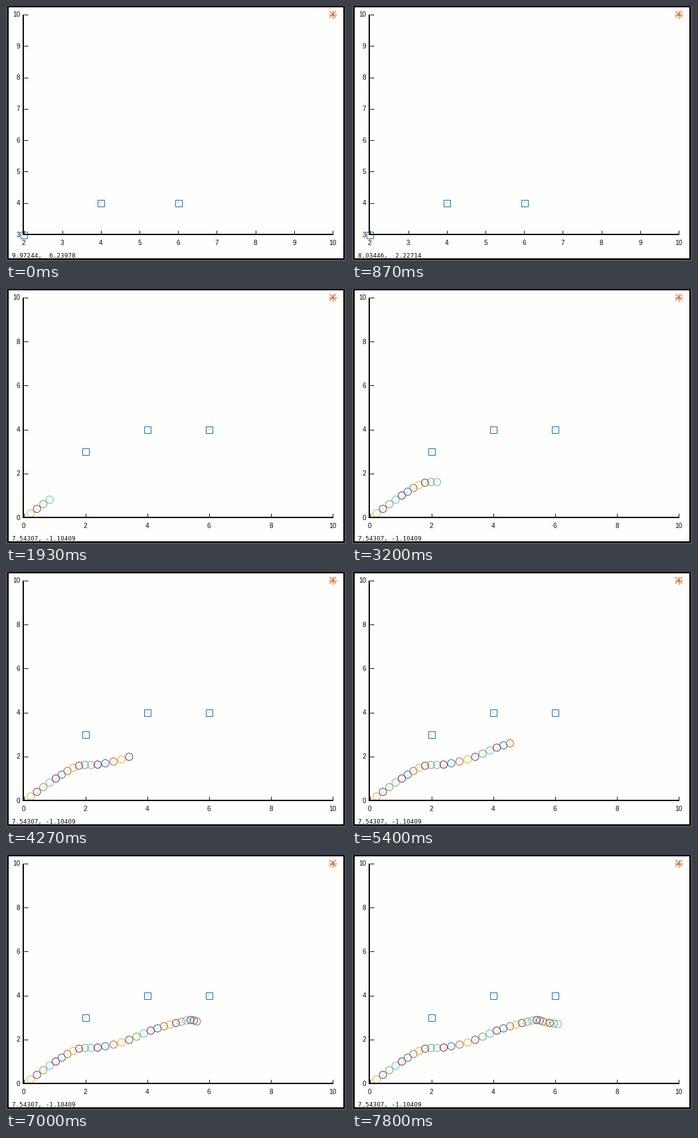
Write a matplotlib script that moves like this. It is 512 px wide and 384 px high and loops after 8000 ms.

```python
import numpy as np
import matplotlib.pyplot as plt
from matplotlib.animation import FuncAnimation
from matplotlib.patches import Circle, Rectangle

W, H, DPI = 512, 384, 64
LOOP, STEP = 8000, 40
PT = 72 / DPI                      # points per pixel
LEFT, RIGHT, TOP, BOTTOM = 26.5, 492, 13, 344
PAPER, EDGE, INK = "#fefefd", "#50524c", "#0c0c08"
YELLOW, PURPLE, GREEN, CYAN = "#e4b02c", "#74387c", "#78a636", "#56bcdc"
RED, BLUE, ORANGE = "#9c1c34", "#1472b4", "#cc5a20"
CYCLE = [YELLOW, PURPLE, GREEN, CYAN, RED, BLUE, ORANGE]

RESCALE = 1470                     # when the axes switch to 0..10
MOUSE_STOP = 700
COUNT = 32

fig = plt.figure(figsize=(W / DPI, H / DPI), dpi=DPI, facecolor=EDGE)
ax = fig.add_axes([0, 0, 1, 1])
ax.set(xlim=(0, W), ylim=(H, 0))
ax.axis("off")


def smooth(n, keys):
    """Cubic Hermite curve through rows of (n, x, y)."""
    keys = np.array(keys, float)
    ns, pts = keys[:, 0], keys[:, 1:]
    slopes = np.gradient(pts, ns, axis=0)
    k = np.clip(np.searchsorted(ns, n, side="right") - 1, 0, len(ns) - 2)
    h = (ns[k + 1] - ns[k])[:, None]
    u = (n - ns[k])[:, None] / h
    ease = u * u * (3 - 2 * u)
    return (pts[k] + ease * (pts[k + 1] - pts[k])
            + h * u * (1 - u) * ((1 - u) * slopes[k] - u * slopes[k + 1]))


def box(x, y, w, h, color):
    ax.add_patch(Rectangle((x, y), w, h, fc=color, ec="none"))


def line(xs, ys, color=INK, width=1.0):
    return ax.plot(xs, ys, color=color, lw=width * PT,
                   solid_capstyle="butt")[0]


def label(x, y, text, ha):
    return ax.text(x, y, text, color=INK, family="Liberation Sans",
                   size=10 * PT, ha=ha, va="baseline")


def dot(x, y, color):
    return ax.add_patch(Rectangle((x - 0.5, y - 0.5), 1, 1, fc=color,
                                  ec="none", alpha=0.7))


def to_px(x, y, x0, y0):
    return (LEFT + (x - x0) / (10 - x0) * (RIGHT - LEFT),
            BOTTOM - (y - y0) / (10 - y0) * (BOTTOM - TOP))


def scale(x0, y0, step):
    """Ticks, labels and obstacles for axes running from (x0, y0) to 10."""
    parts = []
    for v in range(x0, 11, step):
        x, _ = to_px(v, y0, x0, y0)
        parts += [line([x, x], [BOTTOM - 6, BOTTOM]),
                  label(x, 359.5, str(v), "center")]
    for v in range(y0, 11, step):
        _, y = to_px(x0, v, x0, y0)
        parts += [line([LEFT, LEFT + 6], [y, y]),
                  label(21.5, y + 3.5, str(v), "right")]
    for p in [(2, 3), (4, 4), (6, 4)]:
        x, y = np.floor(to_px(*p, x0, y0)) + 0.5
        parts += [ax.add_patch(Rectangle((x - 5, y - 5), 10, 10, fill=False,
                                         ec=BLUE, lw=PT)),
                  dot(x, y, BLUE)]
    return parts


# Window frame and axes
box(0, 0, W, H, EDGE)
box(2, 0, 508, 382, "black")
box(4, 2, 504, 378, PAPER)
line([LEFT - 0.5] * 2, [TOP - 0.5, BOTTOM + 1], width=2)
line([LEFT - 1, RIGHT + 0.5], [BOTTOM] * 2, width=2)

before = scale(2, 3, 1)
after = scale(0, 0, 2)

# Goal
for dx, dy in [(6, 0), (0, 6), (5, 5), (5, -5)]:
    line([492 - dx, 492 + dx], [12.5 - dy, 12.5 + dy], ORANGE)

# Robot trail: a smooth path, slowing a little as it grows
n = np.arange(1, COUNT + 1)
path = smooth(n, [(1, 37, 338), (5, 75, 311), (9, 110, 291.7),
                  (12, 138, 290), (15, 174, 282.3), (19, 218, 264.5),
                  (23, 256, 253), (26, 278, 248.5), (29, 292, 252),
                  (32, 310, 254.5)])
births = np.interp(n, [1, 4, 11, 22, 32], [RESCALE, 1910, 3180, 5480, 7740])

trail = []
for i, (x, y) in enumerate(path):
    c = CYCLE[i % len(CYCLE)]
    ring = ax.add_patch(Circle((x, y), 5.5, fill=False, ec=c, lw=PT))
    trail.append((ring, dot(x, y, c)))

readout = ax.text(9, 379, "", color=INK, family="DejaVu Sans Mono",
                  size=9.2 * PT, va="baseline")


def mouse(t):
    if t >= RESCALE:
        return 7.54307, -1.10409
    k = min(t / MOUSE_STOP, 1)
    return (9.97244 + k * (8.03446 - 9.97244),
            6.23978 + k * (2.22714 - 6.23978))


def update(i):
    t = i * STEP
    for part in before:
        part.set_visible(t < RESCALE)
    for part in after:
        part.set_visible(t >= RESCALE)
    for parts, born in zip(trail, births):
        for part in parts:
            part.set_visible(t >= born)
    mx, my = mouse(t)
    readout.set_text(f"{mx:.6g}, {my: .6g}")
    return []


anim = FuncAnimation(fig, update, frames=LOOP // STEP, interval=STEP,
                     init_func=lambda: update(0), repeat=True,
                     repeat_delay=0, blit=False)
plt.show()
```
